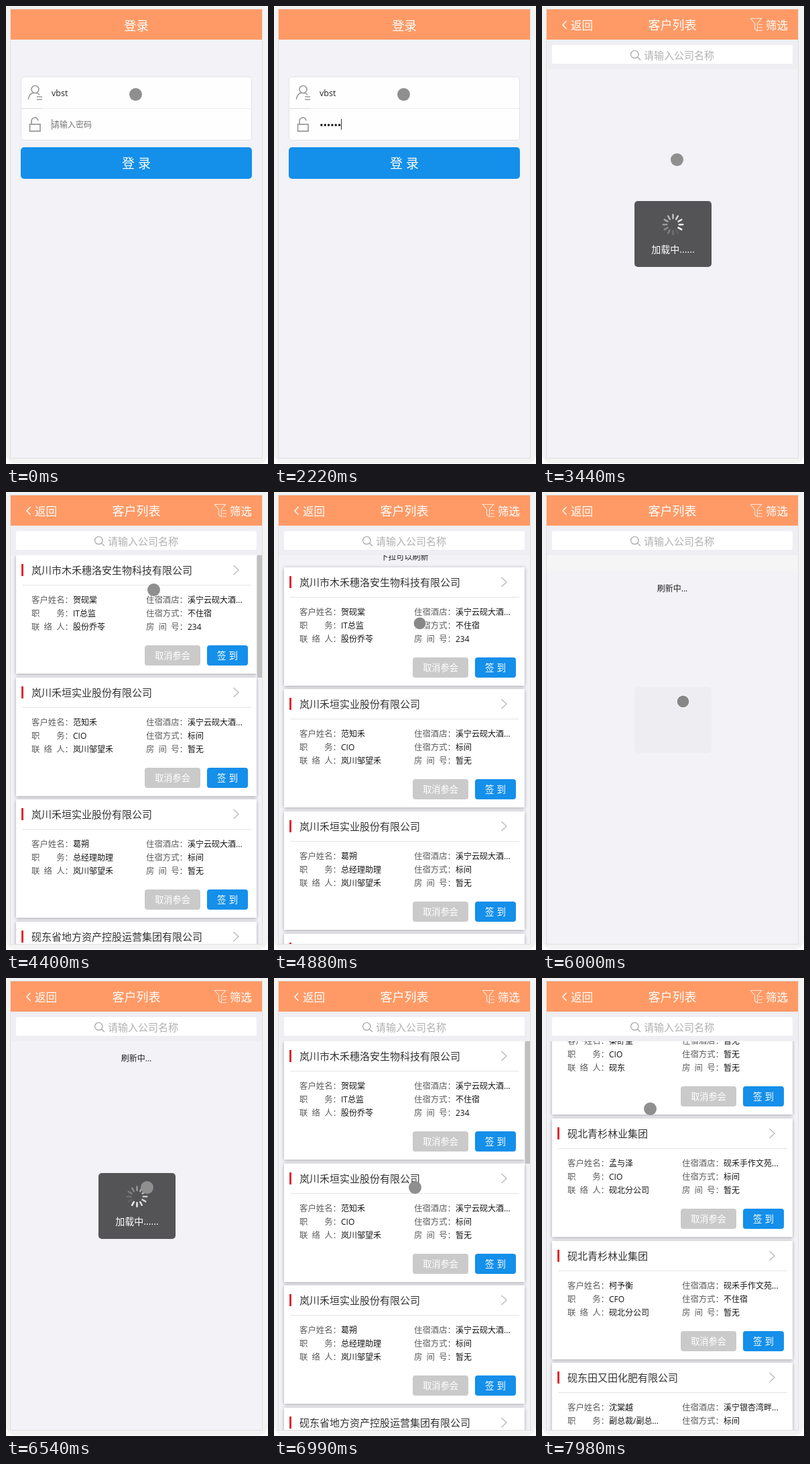
Animation, 391 px wide and 681 px high, one loop 8 s. Source, as an HTML page with a canvas:

```html
<!DOCTYPE html>
<html lang="zh-CN">
<head>
<meta charset="utf-8">
<title>客户列表</title>
<style>
  html, body { margin: 0; width: 100%; height: 100%; overflow: hidden; background: #fff; }
  canvas { display: block; }
</style>
</head>
<body>
<canvas id="stage" width="391" height="681"></canvas>
<script>
const ctx = document.getElementById('stage').getContext('2d');
const LOOP = 8000;
const FONT = '"Open Sans", "Noto Sans CJK SC", "Noto Sans CJK", sans-serif';
const LIST_TOP = 94, PAGE_BOTTOM = 672, CARD_PITCH = 181.67;
const ORANGE = '#ff9a66', BLUE = '#148fea', LAVENDER = '#f2f2f7';

// Movement is visible in bursts of evenly held steps: [start, end, steps]
const BURSTS = [
  [2650, 2770, 2], [3050, 4010, 8], [4130, 5150, 9],
  [5300, 5570, 3], [6000, 6990, 8], [7140, 7980, 7]
];
const KEY_TIMES = [830, 980, 1260, 1660, 1940, 2220];

const POINTER_X = [[2530, 193], [2650, 198], [2770, 201], [4010, 201], [4385, 220], [5300, 213], [5570, 210], [6990, 210], [7420, 161]];
const POINTER_Y = [[2530, 131], [2650, 184], [2770, 228], [4010, 228], [4385, 145], [5300, 264], [5570, 311], [6990, 311], [7420, 194]];
const PULL = [[4385, 0], [5300, 42], [5570, 64], [6000, 64], [6283, 40], [6600, 40], [6848, 0]];
const TOAST = [[3050, 0.03], [3187, 1], [3590, 1], [3740, 0], [5999, 0], [6000, 0.03], [6141, 1], [6560, 1], [6707, 0]];
const BAR = [[4390, 1], [4770, 0], [6560, 0], [6700, 1], [7700, 1], [7980, 0]];

// company, customer, post, contact, hotel, lodging, room
const CARDS = [
  ['岚川市木禾穗洛安生物科技有限公司', '贺砚棠', 'IT总监', '股份乔苓', '溪宁云砚大酒...', '不住宿', '234'],
  ['岚川禾垣实业股份有限公司', '范知禾', 'CIO', '岚川邹望禾', '溪宁云砚大酒...', '标间', '暂无'],
  ['岚川禾垣实业股份有限公司', '葛朔', '总经理助理', '岚川邹望禾', '溪宁云砚大酒...', '标间', '暂无'],
  ['砚东省地方资产控股运营集团有限公司', '秦舒望', 'CIO', '砚东', '暂无', '暂无', '暂无'],
  ['砚北青杉林业集团', '孟与泽', 'CIO', '砚北分公司', '砚禾手作文苑...', '标间', '暂无'],
  ['砚北青杉林业集团', '柯予衡', 'CFO', '砚北分公司', '砚禾手作文苑...', '不住宿', '暂无'],
  ['砚东田又田化肥有限公司', '沈棠越', '副总裁/副总...', '砚东', '溪宁银杏湾畔...', '标间', '暂无']
];
const LABELS = ['客户姓名', '职务', '联络人', '住宿酒店', '住宿方式', '房间号'];

function track(t, keys) {
  if (t <= keys[0][0]) return keys[0][1];
  for (let i = 1; i < keys.length; i++) {
    const [t0, v0] = keys[i - 1], [t1, v1] = keys[i];
    if (t < t1) return v0 + (v1 - v0) * (t - t0) / (t1 - t0);
  }
  return keys[keys.length - 1][1];
}

function hold(t) {
  let held = 0;
  for (const [start, end, steps] of BURSTS) {
    if (t < start) break;
    const gap = (end - start) / (steps - 1);
    held = Math.min(end, start + Math.floor((t - start) / gap) * gap);
  }
  return held;
}

function scrollAt(t) {
  const dragged = 311 - track(t, POINTER_Y);
  if (t < 7000) return 0;
  if (t < 7420) return dragged;
  const p = Math.min(1, (t - 7420) / 560);
  return 117 + 494.7 * (1 - (1 - p) ** 3);
}

function rect(x, y, w, h, color) {
  ctx.fillStyle = color;
  ctx.fillRect(x, y, w, h);
}

function round(x, y, w, h, r, color) {
  ctx.beginPath();
  ctx.roundRect(x, y, w, h, r);
  ctx.fillStyle = color;
  ctx.fill();
}

function stroke(d, color, width = 1) {
  ctx.strokeStyle = color;
  ctx.lineWidth = width;
  ctx.stroke(new Path2D(d));
}

// cy is the vertical middle of the Chinese glyphs
function text(str, x, cy, size, color, align = 'left', weight = 400) {
  ctx.font = `${weight} ${size}px ${FONT}`;
  ctx.textAlign = align;
  ctx.fillStyle = color;
  ctx.fillText(str, x, cy + size * 0.38);
}

// Spreads a short label over the width of four characters
function label(str, x, cy) {
  const size = 12.4, gap = size * 3 / (str.length - 1);
  [...str].forEach((ch, i) => text(ch, x + i * gap, cy, size, '#5c5c5c'));
  text('：', x + size * 4, cy, size, '#5c5c5c');
}

function drawFrame() {
  rect(0, 0, 391, 681, '#fff');
  round(0, 0, 391, 680, [4, 4, 14, 14], '#f3f3f3');
  rect(6, 4, 377, 669, '#dfdfe1');
  rect(7, 5, 375, 667, LAVENDER);
  rect(7, 5, 375, 45, ORANGE);
}

function drawLogin(t) {
  text('登录', 194.5, 28.5, 18.5, '#fff', 'center');
  round(22, 105, 345, 95, 5, '#e3e3e6');
  round(23, 106, 343, 93, 4, '#fefefe');
  rect(23, 152, 343, 1, '#ececee');
  rect(23, 152, 31, 1, '#d8d8da');

  stroke('M49 124a5.5 5.5 0 1 1-11 0a5.5 5.5 0 1 1 11 0M33.5 139c0-5 3-9 7-10M46 129.5c2 .5 3 1.300 4 2.500M46 135h8M46 139h8', '#999', 1.6);
  stroke('M35.500 175.800h15.500v10.400h-15.500zM38 175.500v-4a5 5 0 0 1 10-1', '#999', 1.7);
  text('vbst', 68, 129.5, 12.5, '#222');

  const typed = KEY_TIMES.filter(k => t >= k).length;
  if (!typed) text('请输入密码', 68, 176.5, 12, '#777');
  for (let i = 0; i < typed; i++) {
    ctx.beginPath();
    ctx.arc(70.9 + i * 5.33, 177, 1.75, 0, Math.PI * 2);
    ctx.fillStyle = '#111';
    ctx.fill();
  }
  const caretOn = t < 560 || (typed && t < 2650);
  if (caretOn) rect(Math.round(68 + typed * 5.33), 168, 1, 16, typed ? '#333' : '#888');

  round(22, 210, 345, 47, 5, BLUE);
  text('登', 173, 234, 19, '#fff');
  text('录', 197, 234, 19, '#fff');
}

function drawListHeader() {
  stroke('M36.500 22l-5.500 6 5.500 6', '#fff', 1.4);
  text('返回', 43, 28.5, 16.5, '#fff');
  text('客户列表', 194.5, 28.5, 18, '#fff', 'center');
  stroke('M311.500 18.500h16l-6 7.500v11l-4-3v-8zM323 27.500h6M323 32h6M323 36.500h6', '#ffe3d5', 1.2);
  text('筛选', 334, 28.5, 16.5, '#fff');
  rect(7, 50, 375, 44, '#eeeef3');
  round(15, 58, 359, 28, 2, '#fff');
  stroke('M144 72a5.700 5.700 0 1 1-11.400 0a5.700 5.700 0 1 1 11.400 0M142.500 76l4.500 4.300', '#aaa', 1.3);
  text('请输入公司名称', 152, 73, 15, '#b0b0b0');
}

function drawCard([company, ...values], y) {
  ctx.save();
  ctx.shadowColor = 'rgba(0,0,0,.32)';
  ctx.shadowBlur = 5;
  ctx.shadowOffsetY = 1;
  rect(15, y, 359, 176, '#fff');
  ctx.restore();

  rect(23, y + 13, 3, 18, '#e0292f');
  text(company, 38, y + 22, 15, '#333');
  stroke(`M339.500 ${y + 15}l7.500 7-7.500 7`, '#bbb', 1.4);
  rect(24, y + 44, 342, 1, '#e4e4e4');
  values.forEach((value, i) => {
    const x = i < 3 ? 38 : 209, cy = y + 66.5 + (i % 3) * 20;
    label(LABELS[i], x, cy);
    text(value, x + 62, cy, 12, '#151515');
  });
  round(207, y + 134, 83, 30, 4, '#cacaca');
  text('取消参会', 248.5, y + 149, 13.2, '#fff', 'center', 500);
  round(300, y + 134, 61, 30, 4, BLUE);
  text('签', 315, y + 149, 13.5, '#fff', 'left', 500);
  text('到', 332.5, y + 149, 13.5, '#fff', 'left', 500);
}

function drawToast(alpha, t) {
  if (alpha <= 0) return;
  ctx.save();
  ctx.globalAlpha = alpha;
  round(138, 290, 115, 98, 5, 'rgba(0,0,0,.65)');
  text('加载中......', 195.5, 362, 14, '#fff', 'center');
  ctx.translate(195.5, 325);
  ctx.rotate(Math.floor(t / 80) * Math.PI / 6);
  for (let i = 0; i < 12; i++) {
    ctx.globalAlpha = alpha * (i + 1) / 12;
    round(-1.2, -16, 2.4, 8, 1.2, '#fff');
    ctx.rotate(Math.PI / 6);
  }
  ctx.restore();
}

function drawList(t) {
  const pull = track(t, PULL), scroll = scrollAt(t);
  const loaded = (t >= 3700 && t < 6000) || t >= 6600;

  drawListHeader();
  ctx.save();
  ctx.beginPath();
  ctx.rect(7, LIST_TOP, 375, PAGE_BOTTOM - LIST_TOP);
  ctx.clip();
  if (pull > 0) {
    rect(7, LIST_TOP, 375, Math.max(0, pull - 40), '#f5f5f6');
    const hint = t >= 6000 ? '刷新中...' : pull > 40 ? '释放立即刷新' : '下拉可以刷新';
    text(hint, 194.5, LIST_TOP + pull - 15, 12, '#222', 'center');
  }
  if (loaded) {
    CARDS.forEach((card, i) => {
      const y = Math.round(LIST_TOP + i * CARD_PITCH + pull - scroll);
      if (y > LIST_TOP - 185 && y < PAGE_BOTTOM) drawCard(card, y);
    });
    ctx.globalAlpha = track(t, BAR);
    rect(375, LIST_TOP + scroll * 0.315, 7, 182, '#c0c0c0');
  }
  ctx.restore();
  drawToast(track(t, TOAST), t);
}

function drawPointer(t) {
  const pressed = t > 4500 && t < 6100;
  ctx.beginPath();
  ctx.arc(track(t, POINTER_X) + 0.5, track(t, POINTER_Y) + 0.5, 9.5, 0, Math.PI * 2);
  ctx.fillStyle = pressed ? '#878787' : '#8f8f8f';
  ctx.fill();
  if (pressed) {
    ctx.strokeStyle = '#f8f8f8';
    ctx.lineWidth = 1.3;
    ctx.stroke();
  }
}

function render() {
  const now = performance.now() % LOOP;
  const t = hold(now);
  drawFrame();
  if (now < 3050) drawLogin(now);
  else drawList(t);
  drawPointer(t);
  requestAnimationFrame(render);
}
render();
</script>
</body>
</html>
```
